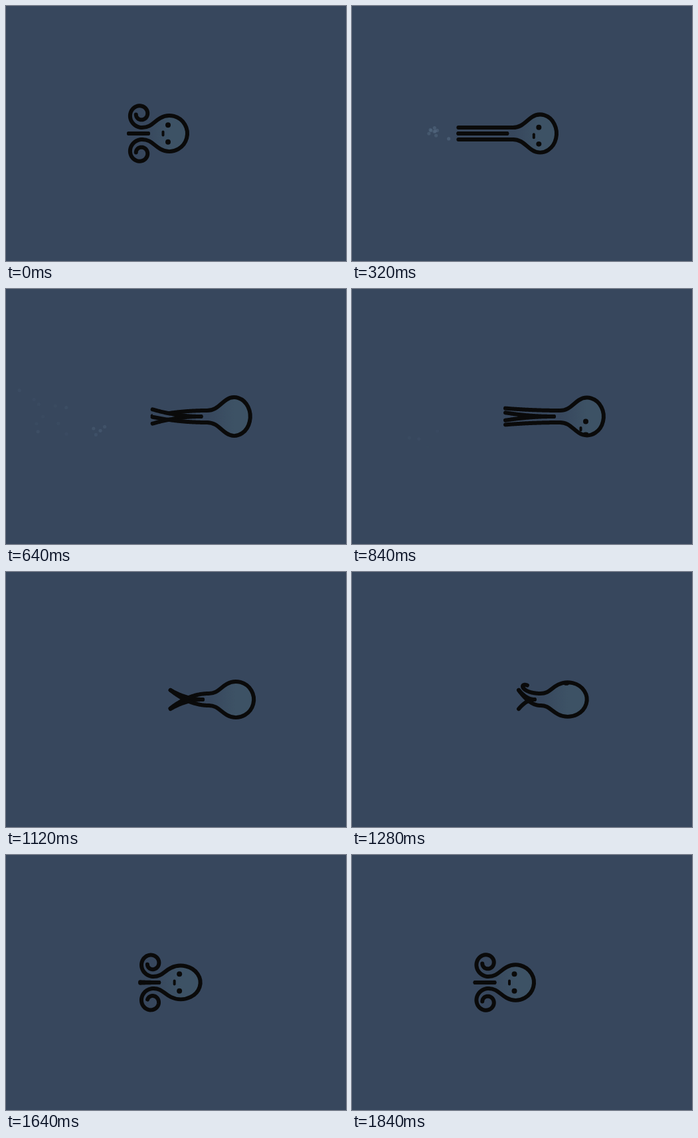
An HTML page with a canvas that plays this animation: 512x384 px, repeating every 1880 ms.

```html
<!DOCTYPE html>
<html lang="en">
<head>
<meta charset="utf-8">
<title>Swimming octopus</title>
<style>
html, body { margin: 0; width: 100%; height: 100%; overflow: hidden; background: #37475d; }
canvas { display: block; width: 512px; height: 384px; }
</style>
</head>
<body>
<canvas id="stage" width="512" height="384"></canvas>
<script>
const ctx = document.getElementById('stage').getContext('2d');
const LOOP = 1880, STEP = 40, MID_Y = 192;
const SEA = '#37475d', SKIN = '#3d5265', INK = '#0a0a0a';
const NECK = 41, NECK_R = 9, RAD = Math.PI / 180;

// [ms, degrees]: roll of the head, and twist of the arm tips
const rollKeys = [[0, 0], [320, 8], [480, 53], [840, 404], [1120, 540], [1440, 720], [LOOP, 720]];
const twistKeys = [[0, 0], [320, 0], [480, 225], [840, 335], [1120, 225], [LOOP, 225]];

const clamp = v => Math.max(0, Math.min(1, v));
const lerp = (a, b, u) => a + (b - a) * u;
const ease = (a, b, t) => 0.5 - 0.5 * Math.cos(Math.PI * clamp((t - a) / (b - a)));

function track(keys, t) {
  const i = Math.max(1, keys.findIndex(key => key[0] > t));
  const [t0, a] = keys[i - 1], [t1, b] = keys[i];
  return lerp(a, b, (t - t0) / (t1 - t0));
}

const headX = t => 246 + 108 * (ease(0, 800, t) - ease(960, LOOP, t));
const reach = t => 61 + 62 * ease(0, 320, t) * (1 - ease(860, 1460, t));

// Seeded random numbers
let seed = 11;
function random() {
  seed = (seed * 16807) % 2147483647;
  return seed / 2147483647;
}

const bubbles = Array.from({ length: 14 }, (_, i) => {
  const birth = 225 + 32 * Math.max(0, i - 6) + 20 * random();
  return {
    birth,
    x: headX(birth) - 125 - 8 * random(),
    y: MID_Y - 10 + 20 * random(),
    vx: -0.1 - 0.25 * random(),
    vy: 0.2 * (random() - 0.5)
  };
});

function trace(points) {
  ctx.beginPath();
  points.forEach(([x, y]) => ctx.lineTo(x, y));
}

function strokeArm(points) {
  trace(points);
  ctx.stroke();
}

function dot(x, y, rx, ry = rx) {
  ctx.beginPath();
  ctx.ellipse(x, y, rx, ry, 0, 0, 7);
  ctx.fill();
}

function drawBubbles(t) {
  ctx.fillStyle = '#5b7189';
  for (const b of bubbles) {
    const age = t - b.birth;
    if (age < 0 || age > 500) continue;
    ctx.globalAlpha = 0.5 * (1 - age / 500);
    dot(b.x + b.vx * age, b.y + b.vy * age, 2.6);
  }
  ctx.globalAlpha = 1;
}

// An arm sits at an angle around the body axis; side arms also curl up at rest
function armPoints(t, phase, curl) {
  const open = ease(0, 320, t) * (1 - ease(1400, 1680, t));
  const side = Math.round(Math.sin(phase * RAD));
  const root = side ? NECK : 32 + 18 * open;
  const length = lerp(reach(t) - root, side ? 97 : 61 - 32, curl);
  const spread = NECK_R + 11 * clamp((t - 320) / 800) ** 2;
  const tip = spread * Math.sin((phase + track(twistKeys, t)) * RAD);
  const swing = (tip - side * NECK_R) * open;

  const n = 60, points = [];
  let x = headX(t) - root, y = MID_Y + side * NECK_R;
  for (let i = 0; i <= n; i++) {
    points.push([x, y + swing * (i / n) ** 2]);
    const u = (i + 0.5) / n, heading = side * curl * (300 * u + 150 * u ** 3) * RAD;
    x -= Math.cos(heading) * length / n;
    y += Math.sin(heading) * length / n;
  }
  return points;
}

function traceHead(cx, rx, ry) {
  const bend = 120 * RAD, ex = cx + rx * Math.cos(bend), ey = ry * Math.sin(bend);
  const neck = cx - NECK, hold = lerp(neck, ex, 0.48), sx = rx * 0.39, sy = ry * 0.22;
  ctx.beginPath();
  ctx.moveTo(neck, MID_Y - NECK_R);
  ctx.bezierCurveTo(hold, MID_Y - NECK_R, ex - sx, MID_Y - ey + sy, ex, MID_Y - ey);
  ctx.ellipse(cx, MID_Y, rx, ry, 0, -bend, bend);
  ctx.bezierCurveTo(ex - sx, MID_Y + ey - sy, hold, MID_Y + NECK_R, neck, MID_Y + NECK_R);
}

function drawFace(cx, roll) {
  const feature = (offset, paint) => {
    const angle = (roll + offset) * RAD, depth = Math.cos(angle);
    if (depth > 0.05) paint(MID_Y + 27 * Math.sin(angle), depth);
  };
  const eye = (y, depth) => dot(cx - 2, y, 4, Math.min(4, 1 + 3.5 * depth));
  ctx.fillStyle = INK;
  feature(-28, eye);
  feature(28, eye);
  feature(0, (y, depth) => {
    ctx.lineWidth = 4;
    strokeArm([[cx - 9.5, y - 2.5 * depth], [cx - 9.5, y + 2.5 * depth]]);
  });
}

function draw(t) {
  ctx.fillStyle = SEA;
  ctx.fillRect(0, 0, 512, 384);
  drawBubbles(t);

  const cx = headX(t);
  const stretch = t < 1120 ? Math.sin(Math.PI * t / 1120) : -Math.sin(Math.PI * (t - 1120) / (LOOP - 1120));
  const uncurl = 1 - ease(0, 320, t);
  const upper = armPoints(t, -90, uncurl + ease(1100, 1560, t));
  const lower = armPoints(t, 90, uncurl + ease(1340, 1680, t));
  const front = armPoints(t, 0, 0), back = armPoints(t, 180, 0);

  ctx.strokeStyle = INK;
  ctx.lineWidth = 6;
  ctx.lineCap = ctx.lineJoin = 'round';
  strokeArm(upper);

  // the web between the front and lower arms hides what is behind it
  trace([...front, ...lower.slice().reverse()]);
  ctx.fillStyle = SEA;
  ctx.fill();

  const skin = ctx.createLinearGradient(cx - NECK, 0, cx, 0);
  skin.addColorStop(0, SEA);
  skin.addColorStop(1, SKIN);
  traceHead(cx, 27 - 3 * stretch, 27 + 2 * stretch);
  ctx.fillStyle = skin;
  ctx.fill();
  ctx.stroke();

  [back, front, lower].forEach(strokeArm);
  drawFace(cx, track(rollKeys, t));
}

const start = performance.now();
function tick() {
  const t = (performance.now() - start) % LOOP;
  draw(Math.floor(t / STEP) * STEP);
  requestAnimationFrame(tick);
}
tick();
</script>
</body>
</html>
```
